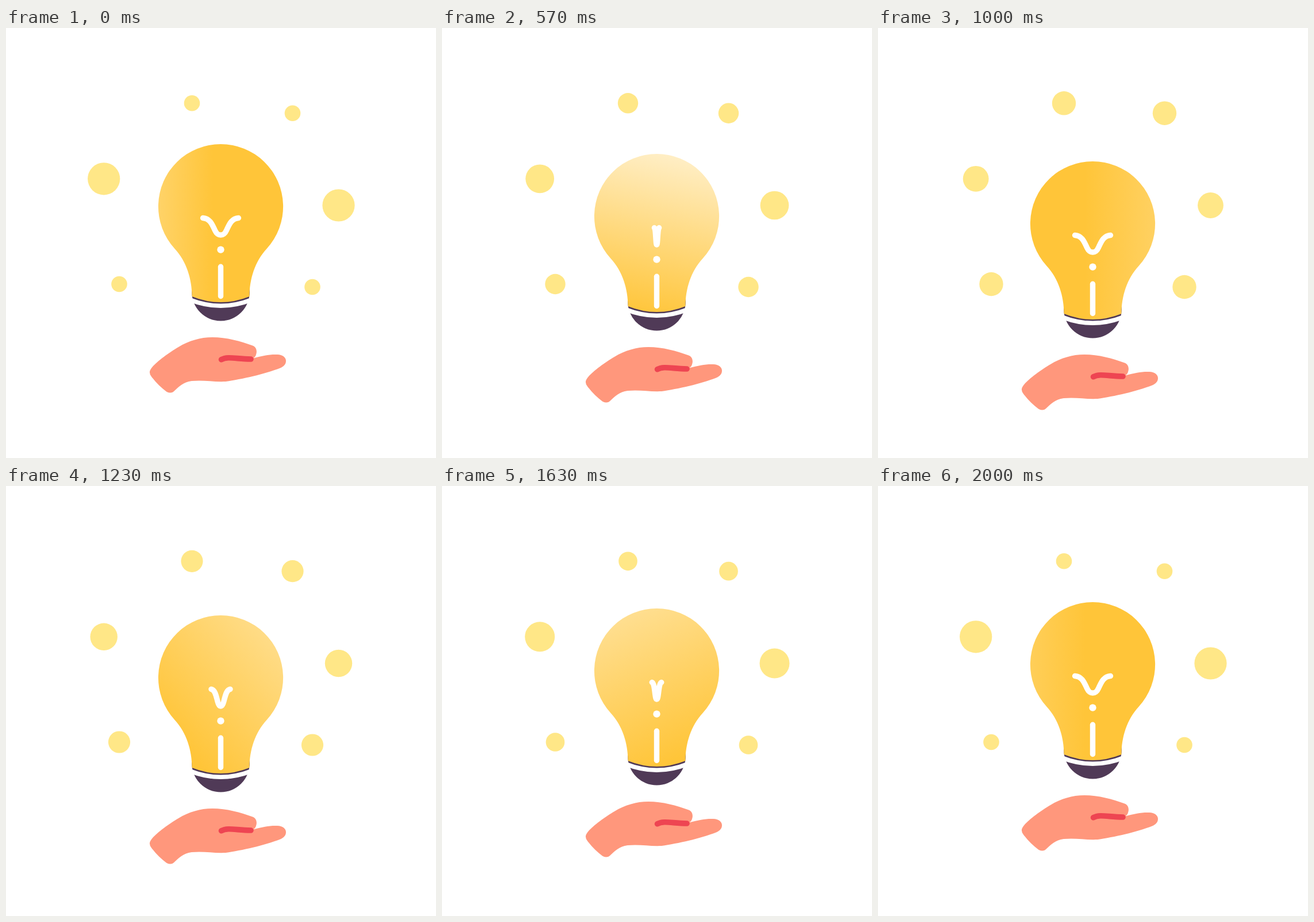
Write an HTML page that moves like this. It is 748 by 748 pixels and loops after 2.03 s.

```html
<!DOCTYPE html>
<html lang="en">
<head>
<meta charset="utf-8">
<title>Idea in hand</title>
<style>
  html, body { margin: 0; width: 100%; height: 100%; overflow: hidden; background: #fff; }
  svg { display: block; width: 100%; height: 100%; }
</style>
</head>
<body>
<svg viewBox="0 0 748 748">
  <defs>
    <linearGradient id="shine" gradientUnits="userSpaceOnUse">
      <stop offset="0" stop-color="#fff"/>
      <stop offset="1" stop-color="#ffc539"/>
    </linearGradient>
  </defs>
  <g id="dots" fill="#ffe787"></g>
  <g id="floating" fill="none" stroke-linecap="round">
    <circle cx="373.5" cy="459.3" r="50.3" fill="#503a57"/>
    <path fill="url(#shine)" d="M323.5 467C323.5 437 314 406 293.5 384A108.6 108.6 0 1 1 453.5 384C433 406 423.5 437 423.5 467Q373.5 487 323.5 467Z"/>
    <path d="M320 472.7Q373.5 493.8 427 472.7" stroke="#fff" stroke-width="7.6"/>
    <g stroke="#fff" stroke-width="9.4">
      <path id="filament" stroke-linejoin="round"/>
      <path d="M373.5 415.3V466.5"/>
    </g>
    <circle cx="373.5" cy="385.6" r="6.2" fill="#fff"/>
    <path fill="#ff977c" d="M250 598C251 588 280 567 300 555C318 544 338 538 359 538C384 538 408 545 429 552.5C436 555 437 563 435 568Q434 572 430 574.5C447 570 458 567.5 472 568C481 568 487 573 487 579C487 585 483 589 477 591.5C450 602 410 611 382 615C360 616 345 612 323 614C308 616 301 624 292 632C288 635.5 283 635 279 632.5C270 626 261 617 253 606.5Q249.5 602 250 598Z"/>
    <path d="M374.5 576.8C386 570.5 400 575.8 426 576" stroke="#ee4552" stroke-width="9.6"/>
  </g>
</svg>
<script>
const LOOP = 2030, STEP = 100 / 3, HALF = 30;
const byId = id => document.getElementById(id);
const mix = (a, b, k) => a + (b - a) * k;
const clamp = k => Math.min(1, Math.max(0, k));

// Small dots grow while the large ones shrink.
const SMALL = [13.8, 20.7], LARGE = [28.1, 22.4];
const dots = [
  [323.5, 130.8, SMALL], [498.5, 148.2, SMALL],
  [170.2, 262.3, LARGE], [578.5, 308.5, LARGE],
  [197, 445.5, SMALL], [533, 450.5, SMALL]
].map(([x, y, range]) => {
  const el = document.createElementNS("http://www.w3.org/2000/svg", "circle");
  el.setAttribute("cx", x);
  el.setAttribute("cy", y);
  byId("dots").append(el);
  return { el, range };
});

function filamentPath(scale) {
  const at = (x, y) => `${(373.5 + x * scale).toFixed(2)} ${y} `;
  return "M" + at(-31, 330.5) +
    "C" + at(-18, 331.5) + at(-14.5, 343) + at(-10, 352) +
    "C" + at(-7, 358.5) + at(-4, 360) + at(0, 360) +
    "C" + at(4, 360) + at(7, 358.5) + at(10, 352) +
    "C" + at(14.5, 343) + at(18, 331.5) + at(31, 330.5);
}

// The highlight swings over the bulb around a point at its base.
function setShine(sweep, step) {
  const x = 360, y = 485;
  const angle = Math.PI * sweep;
  const reach = mix(400, 600, clamp((step - 23) / 7));
  const ends = {
    x1: x - reach * Math.cos(angle), y1: y - reach * Math.sin(angle),
    x2: x, y2: y
  };
  for (const key in ends) byId("shine").setAttribute(key, ends[key]);
}

function render(ms) {
  const step = Math.floor((Math.floor(ms / 10) * 10 + 5) / STEP);
  const sweep = 1 - Math.abs(step - HALF) / HALF;
  const open = Math.abs(sweep * 2 - 1);
  byId("floating").setAttribute("transform", `translate(0 ${30 * sweep})`);
  byId("filament").setAttribute("d", filamentPath(open));
  for (const { el, range } of dots) el.setAttribute("r", mix(...range, sweep));
  setShine(sweep, step);
}

const start = performance.now();
function tick() {
  render((performance.now() - start) % LOOP);
  requestAnimationFrame(tick);
}
tick();
</script>
</body>
</html>
```
